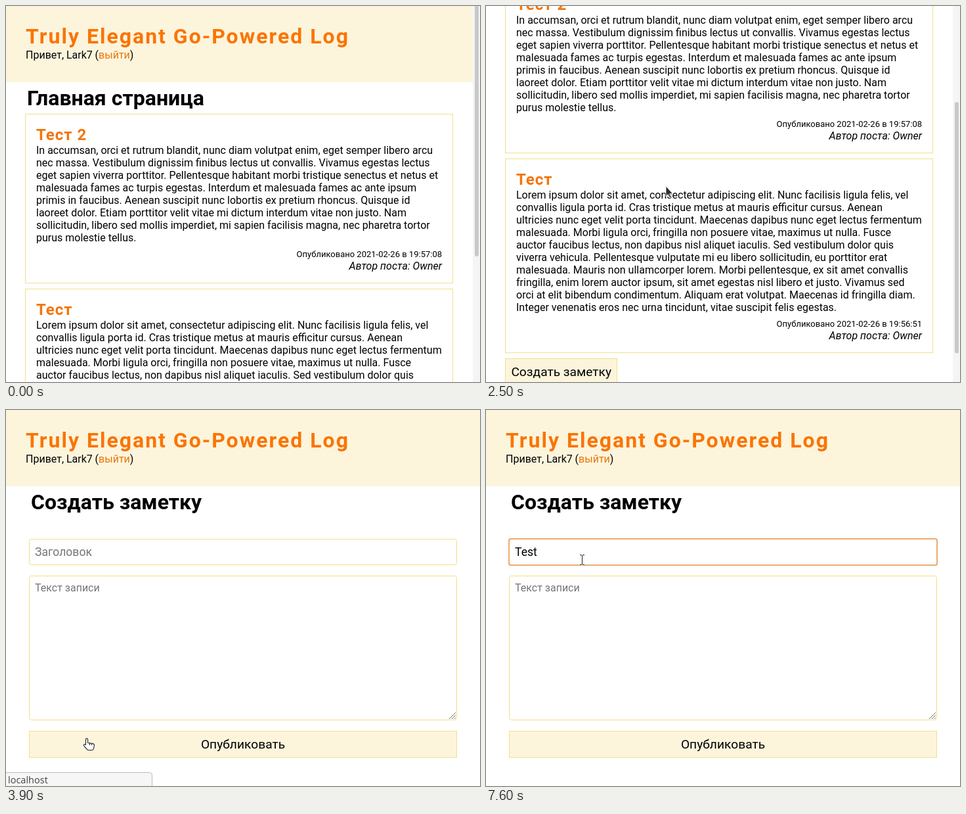
An HTML page that plays this animation: 722x572 px, repeating every 8000 ms.

```html
<!DOCTYPE html>
<html lang="ru">
<head>
<meta charset="utf-8">
<title>Blog</title>
<style>
html, body { margin: 0; width: 100%; height: 100%; overflow: hidden; background: #fff; }
svg { display: block; width: 722px; height: 572px; font-family: Roboto, sans-serif; font-size: 16px; }
text { white-space: pre; }
.title { font-size: 32px; font-weight: 700; letter-spacing: 2px; fill: #fb7405; }
.h1 { font-size: 32px; font-weight: 700; }
.h2 { font-size: 24px; font-weight: 700; letter-spacing: 1px; fill: #f4750a; }
.link { fill: #e8760a; }
.date { font-size: 13px; text-anchor: end; }
.author { font-style: italic; text-anchor: end; }
.label { font-size: 19.2px; text-anchor: middle; }
.input { font-size: 17.6px; }
.hint { fill: #757575; }
.page { font-weight: 700; text-anchor: middle; }
.status { font: 14.5px "Open Sans", sans-serif; fill: #444; }
.box { fill: #fff; stroke: #f0e08c; }
.field { fill: #fff; stroke: #f3dd8c; }
.button { fill: #fcf5dc; stroke: #f0e08c; }
</style>
</head>
<body>
<svg viewBox="0 0 722 572">
  <g id="list"></g>
  <g id="bar">
    <rect x="711" width="11" height="572" fill="#f5f5f5"/>
    <rect id="thumb" x="714" width="6" height="382.5" rx="3" fill="#c9c9c9"/>
  </g>
  <g id="form"></g>
  <g id="status">
    <path d="M-1 551.5H218.5Q222.5 551.5 222.5 555.5V573H-1Z" fill="#f6f6f6" stroke="#bdbdbd"/>
    <text class="status" x="3" y="567.5">localhost</text>
  </g>
  <g id="cursor">
    <g id="beam" fill="none">
      <path d="M-3.5 -7.5H-1.5L0 -6.5L1.5 -7.5H3.5M0 -6.5V6.5M-3.5 7.5H-1.5L0 6.5L1.5 7.5H3.5" stroke="#fff" stroke-width="2.6" opacity=".8"/>
      <path d="M-3.5 -7.5H-1.5L0 -6.5L1.5 -7.5H3.5M0 -6.5V6.5M-3.5 7.5H-1.5L0 6.5L1.5 7.5H3.5" stroke="#222"/>
    </g>
    <path id="arrow" d="M0 -1V14.5L3.4 11.3L5.8 16.8L8.2 15.8L5.8 10.4H10.5Z" fill="#2b2b2b" stroke="#fff" stroke-width=".9"/>
    <path id="hand" d="M-4.5 -7.5C-4.5 -10 -1.6 -10 -1.4 -7.5V-2.8L6.5 -1.4Q8.6 -.8 8.5 1.2L7.6 5.5Q7.2 8.5 4.5 8.5H0Q-2 8.5 -3.4 6.4L-7.4 1.6C-8.4 -.2 -6.4 -1.4 -4.5 .4ZM1.5 -2.3V1M4.5 -1.8V1" fill="#fff" stroke="#222" stroke-width="1.1" stroke-linejoin="round"/>
  </g>
</svg>
<script>
const LOOP = 8000, STEP = 100;
const $ = id => document.getElementById(id);
const show = (id, on) => $(id).setAttribute("display", on ? "inline" : "none");

const text = (cls, x, y, s, id = "") => `<text id="${id}" class="${cls}" x="${x}" y="${y}">${s}</text>`;
const rect = (cls, x, y, w, h, r = 0) =>
  `<rect class="${cls}" x="${x + .5}" y="${y + .5}" width="${w}" height="${h}" rx="${r}"/>`;

const header = w => `<rect width="${w}" height="116" fill="#fcf5dc"/>` +
  text("title", 30, 57, "Truly Elegant Go-Powered Log") +
  text("", 30, 80, 'Привет, Lark7 <tspan x="135.6">(</tspan><tspan class="link">выйти</tspan>)');

function post(top, title, time, body) {
  const lines = body.trim().split("\n");
  const end = top + 61 + 19 * (lines.length - 1);
  return rect("box", 29, top, 651, end + 63 - top) +
    text("h2", 46, top + 40, title) +
    lines.map((s, i) => text("", 46, top + 61 + 19 * i, s)).join("") +
    text("date", 664, end + 24, "Опубликовано 2021-02-26 в " + time) +
    text("author", 664, end + 43, "Автор поста: Owner");
}

$("list").innerHTML = header(711) +
  text("h1", 32, 151, "Главная страница") +
  post(164, "Тест 2", "19:57:08", `
In accumsan, orci et rutrum blandit, nunc diam volutpat enim, eget semper libero arcu
nec massa. Vestibulum dignissim finibus lectus ut convallis. Vivamus egestas lectus
eget sapien viverra porttitor. Pellentesque habitant morbi tristique senectus et netus et
malesuada fames ac turpis egestas. Interdum et malesuada fames ac ante ipsum
primis in faucibus. Aenean suscipit nunc lobortis ex pretium rhoncus. Quisque id
laoreet dolor. Etiam porttitor velit vitae mi dictum interdum vitae non justo. Nam
sollicitudin, libero sed mollis imperdiet, mi sapien facilisis magna, nec pharetra tortor
purus molestie tellus.`) +
  post(430, "Тест", "19:56:51", `
Lorem ipsum dolor sit amet, consectetur adipiscing elit. Nunc facilisis ligula felis, vel
convallis ligula porta id. Cras tristique metus at mauris efficitur cursus. Aenean
ultricies nunc eget velit porta tincidunt. Maecenas dapibus nunc eget lectus fermentum
malesuada. Morbi ligula orci, fringilla non posuere vitae, maximus ut nulla. Fusce
auctor faucibus lectus, non dapibus nisl aliquet iaculis. Sed vestibulum dolor quis
viverra vehicula. Pellentesque vulputate mi eu libero sollicitudin, eu porttitor erat
malesuada. Mauris non ullamcorper lorem. Morbi pellentesque, ex sit amet convallis
fringilla, enim lorem auctor ipsum, sit amet egestas nisl libero et justo. Vivamus sed
orci at elit bibendum condimentum. Aliquam erat volutpat. Maecenas id fringilla diam.
Integer venenatis eros nec urna tincidunt, vitae suscipit felis egestas.`) +
  rect("button", 29, 734, 170, 40) +
  text("label", 114.7, 761, "Создать заметку") +
  text("page", 355, 822, "1");

$("form").innerHTML = '<rect width="722" height="572" fill="#fff"/>' + header(722) +
  text("h1", 38, 151, "Создать заметку") +
  rect("field", 35, 196, 651, 39, 3) +
  '<rect id="focus" x="35" y="196" width="652" height="40" rx="2.5" fill="none" stroke="#ebae6c" stroke-width="2"/>' +
  text("input", 44, 222, "", "typed") +
  '<rect id="caret" y="205" width="1" height="22"/>' +
  rect("field", 35, 252, 651, 219, 3) +
  text("hint", 44, 276, "Текст записи") +
  '<path d="M675 470L685 460M679 470L685 464M683 470L685 468" stroke="#777"/>' +
  rect("button", 35, 488, 651, 40) +
  text("label", 361, 515, "Опубликовать");

// Wheel scroll, one value per step from 2000 ms
const SCROLL = [1, 22, 64, 112, 158, 198, 226, 243, 251, 252];
const scrollAt = t => t < 2000 ? 0 : SCROLL[Math.min(9, Math.floor((t - 2000) / STEP))];

// Pointer path: time, x, y
const PATH = [
  [500, 142, 32], [800, 274, 274], [900, 269, 267], [1000, 269, 267], [1100, 274, 275],
  [3000, 274, 275], [3100, 277, 272], [3200, 194, 411], [3400, 194, 411],
  [3500, 140, 480], [3600, 126, 509], [4300, 126, 509], [5100, 146.5, 228]
];

function pointerAt(t) {
  const i = PATH.findIndex(p => p[0] > t);
  if (i < 0) return PATH[PATH.length - 1].slice(1);
  const [t0, x0, y0] = PATH[i - 1], [t1, x1, y1] = PATH[i];
  let k = (t - t0) / (t1 - t0);
  if (t0 === 4300) k = k * k * (3 - 2 * k);
  return [x0 + (x1 - x0) * k, y0 + (y1 - y0) * k];
}

function shapeAt(t, y) {
  if (t < 2100) return "beam";
  if (t < 2900) return "arrow";
  if (t < 3500) return "beam";
  if (t < 3600) return "arrow";
  if (y > 488) return "hand";
  return y > 472 || (y > 236 && y < 252) ? "arrow" : "beam";
}

const CARETS = [44, 54, 63, 72, 78];

function draw(now) {
  const t = Math.floor(now % LOOP / STEP) * STEP;
  const form = t >= 3800, scroll = scrollAt(t);
  show("list", !form);
  show("bar", !form);
  show("form", form);
  $("list").setAttribute("transform", `translate(0 ${-scroll})`);
  $("thumb").setAttribute("y", -1.5 + .745 * scroll);
  show("status", t >= 3600 && t < 4300);

  const n = t < 6200 ? 0 : Math.min(4, 1 + Math.floor((t - 6200) / 200));
  $("typed").textContent = n ? "Test".slice(0, n) : "Заголовок";
  $("typed").setAttribute("fill", n ? "#000" : "#757575");
  $("caret").setAttribute("x", CARETS[n]);
  show("focus", t >= 5200);
  show("caret", t >= 5200 && t < 7600);

  show("cursor", t >= 500);
  if (t >= 500) {
    const [x, y] = pointerAt(t), shape = shapeAt(t, y);
    $("cursor").setAttribute("transform", `translate(${x} ${y})`);
    for (const id of ["beam", "arrow", "hand"]) show(id, id === shape);
  }
}

const start = performance.now();
function tick() {
  draw(performance.now() - start);
  requestAnimationFrame(tick);
}
tick();
</script>
</body>
</html>
```
